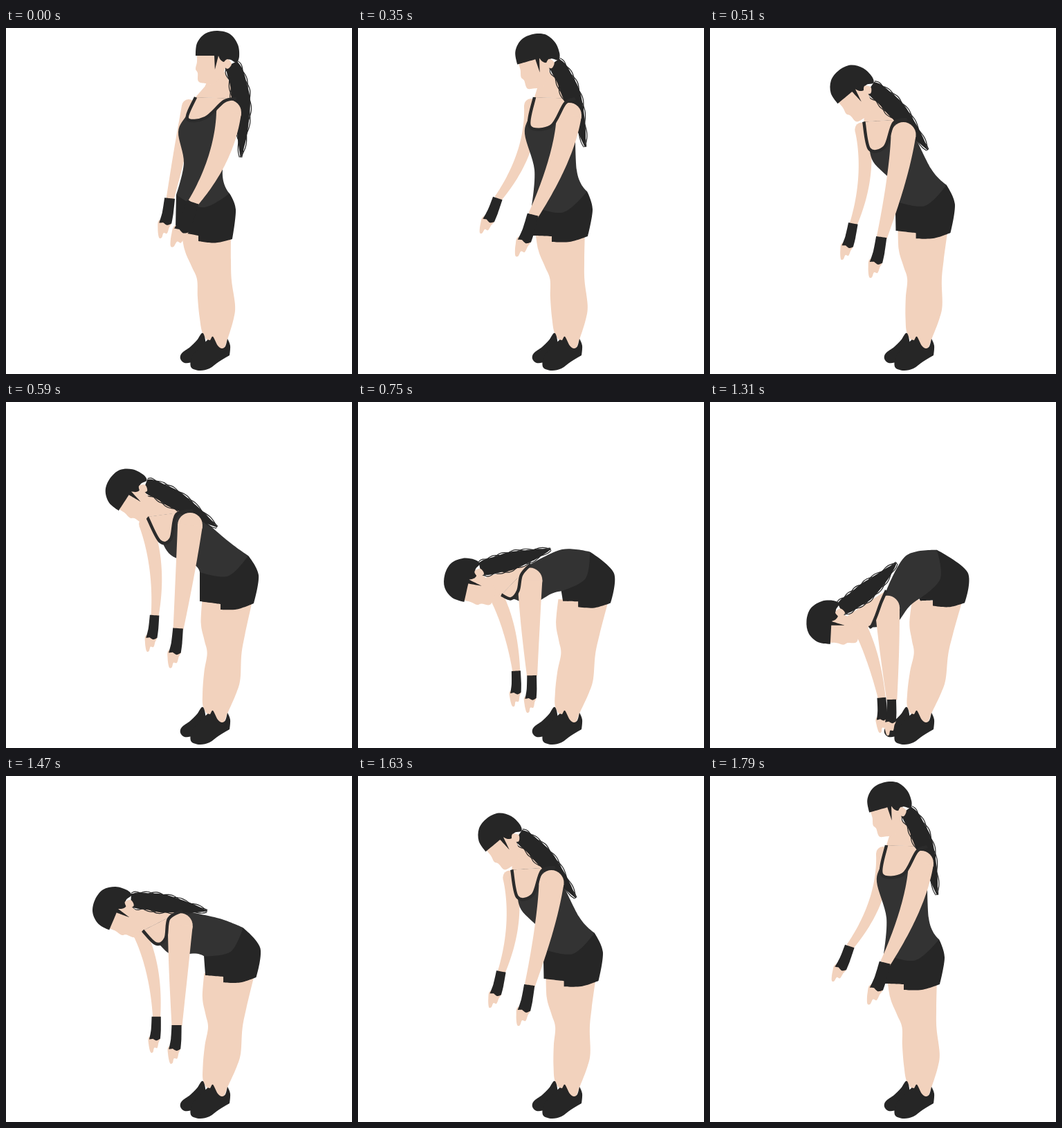
Animation, 500 px wide and 500 px high, one loop 1870 ms. Source, as an HTML page with a canvas:

```html
<!DOCTYPE html>
<html lang="en">
<head>
<meta charset="utf-8">
<title>Toe touch</title>
<style>
html, body { margin: 0; height: 100%; overflow: hidden; background: #fff; }
canvas { display: block; width: 100vw; height: 100vh; }
</style>
</head>
<body>
<canvas id="stage" width="500" height="500"></canvas>
<script>
const ctx = document.getElementById('stage').getContext('2d');
const SKIN = '#f2d2bd', DARK = '#262626', TOP = '#333', STRAP = '#2b2b2b';

// Points are written "x,y"; "!" marks a sharp corner.
const parse = s => s.split(' ').map(p => {
  const [x, y] = p.split(',').map(parseFloat);
  return { x, y, sharp: p.endsWith('!') };
});
const parseAll = o => Object.fromEntries(Object.entries(o).map(([k, s]) => [k, parse(s)]));

// Joints in four key poses: upright, arms out, half bent, toes touched
const JOINTS = parseAll({
  head: '306,36 260,40 177,128 178,333',
  hairMid: '340,108 309,98 246,142 231,283',
  hairTip: '339,187 328,172 305,181 268,238',
  nearShoulder: '322,122 305,126 266,178 260,308',
  nearElbow: '306,188 289,192 259,245 264,372',
  nearWrist: '270,253 253,271 249,328 267,440',
  farShoulder: '264,113 250,112 202,176 225,340',
  farElbow: '251,180 239,180 216,240 242,385',
  farWrist: '237,247 202,247 215,309 255,438'
});
const TORSO = parseAll({
  farTop: '274,100 255,100 204,166 238,337',
  nearTop: '333,102 314,102 270,157 258,282',
  scoopL: '262,131 248,142 222,201 239,333',
  scoopR: '288,130 279,142 238,198 244,318',
  strap: '315,106 299,109 246,163 252,299',
  bust: '249,150 241,153 238,221 272,331',
  waist: '257,195 255,205 272,235 290,301',
  hemL: '246,241 251,257 280,246 305,287',
  hemR: '323,239 331,236 350,222 326,213',
  back: '313,205 316,205 321,201 280,225',
  legL: '245,294 253,300 280,288 306,287',
  step: '278,308 280,309 310,300 323,294',
  legR: '327,305 332,301 358,291 369,290',
  seat: '332,262 339,262 365,250 373,246'
});
const TURN = [0, -16, -57, -90], LEAN = [0, 3, 30, 39];

// How far each step of the bend has come along the key poses
const STEPS = [0, 1, 1.3, 1.58, 2, 2.31, 2.62, 2.92, 3];

// Rigid parts, relative to the head centre or the wrist
const face = parse('-30,2! -30,13 -32,23 -29,29 -28,41 -18,44 -4,44 10,25 12,5!');
const cap = parse('-32,4! -30,-14 -18,-28 0,-32 18,-27 29,-12 31,5 27,14 19,10 14,10 9,13 4,10 1,4! -4,24! -5,4!');
const ear = parse('8,16 14,9 20,16 14,23');
const glove = parse('-8,-1! 7,-1! 7,20 6,35! 0,38 -6,35! -12,36! -9,20');
const fingers = parse('-12,32 -13,44 -10,57 -6,57 -4,50 1,50 3,42 5,33');
const [throat, nape, hairRoot] = parse('-15,40 10,27 20,16');

const leg = parse('252,285! 258,320 268,344 276,363 277,390 280,420 285,443 300,460 313,465 320,450 329,420 331,400 326,365 325,335 325,290!');
const farShoe = parse('283,441 276,451 266,461 254,470 252,478 258,484 270,483! 290,465! 287,446');
const nearShoe = parse('291,451 284,458 272,470 267,480 268,491 280,495 294,492 308,482 323,473! 324,459 320,449! 317,460 312,463 306,459 299,446 295,451');

const mix = (a, b, u) => a + (b - a) * u;
const between = (a, b, u = .5) => ({ x: mix(a.x, b.x, u), y: mix(a.y, b.y, u) });
const shift = (p, dx, dy) => ({ x: p.x + dx, y: p.y + dy });
const corner = p => ({ ...p, sharp: true });

// Joints swing on arcs around a pivot behind the hips.
const PIVOT = { x: 400, y: 240 };
function swing(a, b, u) {
  const polar = p => [Math.hypot(PIVOT.x - p.x, p.y - PIVOT.y), Math.atan2(p.y - PIVOT.y, PIVOT.x - p.x)];
  const [ra, ta] = polar(a), [rb, tb] = polar(b);
  const r = mix(ra, rb, u), t = mix(ta, tb, u);
  return { x: PIVOT.x - r * Math.cos(t), y: PIVOT.y + r * Math.sin(t) };
}
function at(track, pose, blend) {
  const i = Math.min(2, Math.floor(pose));
  return blend(track[i], track[i + 1], pose - i);
}
const solve = (tracks, pose) =>
  Object.fromEntries(Object.entries(tracks).map(([k, t]) => [k, at(t, pose, swing)]));

function place(pts, origin, turn, scale = 1) {
  const c = Math.cos(turn) * scale, s = Math.sin(turn) * scale;
  return pts.map(p => ({ x: origin.x + p.x * c - p.y * s, y: origin.y + p.x * s + p.y * c, sharp: p.sharp }));
}

function trace(pts, closed) {
  const n = pts.length;
  const get = i => pts[closed ? (i + n) % n : Math.max(0, Math.min(n - 1, i))];
  const handle = (i, side) => {
    const p = get(i), a = get(i - 1), b = get(i + 1), k = p.sharp ? 0 : side / 6;
    return [p.x + (b.x - a.x) * k, p.y + (b.y - a.y) * k];
  };
  ctx.beginPath();
  ctx.moveTo(pts[0].x, pts[0].y);
  for (let i = 0; i < (closed ? n : n - 1); i++) {
    const q = get(i + 1);
    ctx.bezierCurveTo(...handle(i, 1), ...handle(i + 1, -1), q.x, q.y);
  }
}
function fill(pts, color, closed = true) {
  trace(pts, closed);
  ctx.fillStyle = color;
  ctx.fill();
}
function line(pts, color, width) {
  trace(pts, false);
  ctx.strokeStyle = color;
  ctx.lineWidth = width;
  ctx.stroke();
}

// A curve from a through m to b, pushed sideways by offset(u)
const bendPoint = (a, m, b) => ({ x: 2 * m.x - (a.x + b.x) / 2, y: 2 * m.y - (a.y + b.y) / 2 });
function ribbon(a, m, b, offset) {
  const c = bendPoint(a, m, b);
  return Array.from({ length: 25 }, (_, i) => {
    const u = i / 24, p = between(a, c, u), q = between(c, b, u), mid = between(p, q, u);
    const dx = q.x - p.x, dy = q.y - p.y, k = offset(u) / Math.hypot(dx, dy);
    return { x: mid.x - dy * k, y: mid.y + dx * k, sharp: i === 0 || i === 24 };
  });
}
const band = (a, m, b, width) =>
  [...ribbon(a, m, b, width), ...ribbon(a, m, b, u => -width(u)).reverse()];

function drawArm(shoulder, elbow, wrist, wide, thin, scale) {
  ctx.beginPath();
  ctx.arc(shoulder.x, shoulder.y, wide, 0, 7);
  ctx.fillStyle = SKIN;
  ctx.fill();
  fill(band(shoulder, elbow, wrist, u => mix(wide, thin, u) + Math.sin(Math.PI * u)), SKIN);
  const c = bendPoint(shoulder, elbow, wrist);
  const turn = Math.atan2(c.x - wrist.x, wrist.y - c.y) / 2;
  fill(place(fingers, wrist, turn, scale), SKIN);
  fill(place(glove, wrist, turn, scale), DARK);
}

function drawHair(root, mid, tip) {
  const width = u => 13 * Math.sin(Math.PI * (.2 + .8 * u)) ** .8 + Math.sin(u * 16) * (1 - u);
  fill(band(root, mid, tip, width), DARK);
  for (let i = 0; i < 4; i++) {
    const side = i % 2 ? 1 : -1;
    line(ribbon(root, mid, tip, u => side * width(u) + 2 * Math.sin(u * 19 + i * 2)), DARK, 1.2);
  }
}

function draw(pose) {
  const j = solve(JOINTS, pose), t = solve(TORSO, pose);
  const turn = at(TURN, pose, mix) * Math.PI / 180, lean = at(LEAN, pose, mix);
  const [chin, neck, root] = place([throat, nape, hairRoot], j.head, turn);
  const { farTop, nearTop, hemL, hemR, step, legR } = t;
  ctx.fillStyle = '#fff';
  ctx.fillRect(0, 0, 500, 500);

  // the legs lean over fixed feet
  fill(leg.map(p => ({ ...p, x: p.x + lean * Math.max(0, (450 - p.y) / 158) ** 1.2 })), SKIN);
  fill(farShoe, DARK);
  fill(nearShoe, DARK);
  drawArm(j.farShoulder, j.farElbow, j.farWrist, 10, 5.5, 1 - pose * .05);

  fill([corner(hemL), corner(t.legL), corner(shift(step, 0, -8)), corner(step),
    shift(between(step, legR), 0, 4), corner(legR), t.seat, corner(hemR)], DARK);
  const hem = shift(between(hemL, hemR), (hemL.y - hemR.y) / 4, (hemR.x - hemL.x) / 4);
  fill([corner(farTop), between(farTop, t.bust), t.bust, t.waist, corner(hemL), hem,
    corner(hemR), t.back, corner(nearTop)], TOP);

  const collar = [farTop, t.scoopL, t.scoopR, t.strap, nearTop];
  const nook = between(between(chin, farTop), neck, .15);
  fill([chin, nook, farTop, nearTop, neck].map(corner), SKIN);
  fill(collar, SKIN, false);
  drawHair(root, j.hairMid, j.hairTip);
  drawArm(j.nearShoulder, j.nearElbow, j.nearWrist, 18, 7.5, 1.2 - pose * .11);
  line(collar, STRAP, 4.5);

  fill(place(face, j.head, turn), SKIN);
  fill(place(cap, j.head, turn), DARK);
  fill(place(ear, j.head, turn), SKIN);
}

function stepAt(t) {
  if (t < 350) return 0;
  if (t < 910) return 1 + Math.floor((t - 350) / 80);
  if (t < 1310) return 8;
  return 7 - Math.floor((t - 1310) / 80);
}

function tick() {
  draw(STEPS[stepAt(performance.now() % 1870)]);
  requestAnimationFrame(tick);
}
tick();
</script>
</body>
</html>
```
